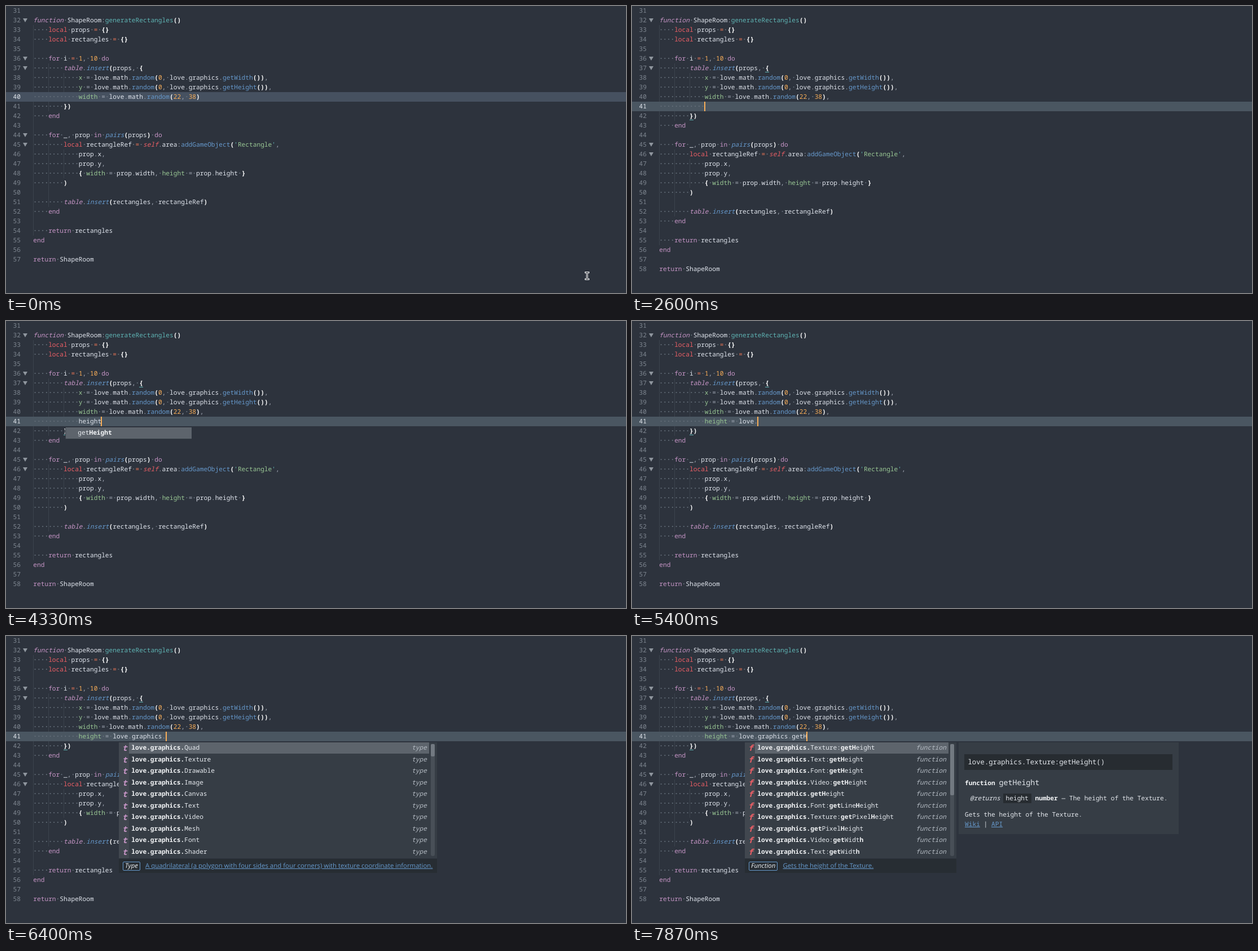
An HTML page for the animation above (8000 ms loop, 1099 px wide and 510 px high).

```html
<!DOCTYPE html>
<html lang="en">
<head>
<meta charset="utf-8">
<title>Code editor</title>
<style>
html, body { margin: 0; width: 100%; height: 100%; overflow: hidden; background: #2d333d; }
#stage {
  position: relative; width: 1099px; height: 510px; overflow: hidden; background: #2d333d; color: #e0e5ed;
  font: 500 11.2px/17px 'Noto Sans Mono', monospace; white-space: pre; text-rendering: geometricPrecision;
  font-variant-ligatures: none;
}
#stage div, #stage svg { position: absolute; }
.row { left: 0; width: 1099px; height: 17px; }
.num { left: 12.6px; color: #7f8791; }
.num.now { color: #e3e8ee; }
.fold { left: 30px; border: 4.5px solid transparent; border-top: 7px solid #8f969e; border-bottom: 0; }
.guide { width: 1px; height: 17px; background: #3b434d; }
.caret { width: 2px; height: 17px; background: #f9ae58; }
.mark { width: 7px; height: 1px; }
.ws { color: #66707b; font-weight: 700; }
.br { color: #fff; font-weight: 700; }
.kw { color: #c695c6; }
.red { color: #ec5f66; }
.blue { color: #6699cc; }
.teal { color: #5fb4b4; }
.str, .key { color: #99c794; }
.num1 { color: #f9ae58; }
.op { color: #f97b58; }
.pun { color: #a6acb9; }
.it { font-style: italic; }
.pop { top: 189px; background: #363d45; }
.sel { background: #5d646c; }
.pop .item { line-height: 20px; color: #e6eaef; }
.pop b, .docs b { color: #f3f5f7; font-weight: 700; }
.kinds { left: 0; top: 0; width: 18px; background: #41474f; }
.kind { left: 6px; font: italic 700 14.5px/20px 'Noto Sans Mono', monospace; }
.detail { right: 18px; line-height: 20px; font-style: italic; color: #b4bbc3; }
.track { top: 3px; width: 7px; height: 199px; border-radius: 3px; background: #484f57; }
.thumb { top: 3px; width: 7px; border-radius: 2px; background: #727981; }
.foot { left: 0; height: 25px; background: #272d33; font: 11.42px/25px 'Open Sans', sans-serif; }
.tag {
  left: 7px; top: 5px; padding: 0 3px; border: 1px solid #6699cc; border-radius: 2px;
  font-style: italic; line-height: 14px; color: #f0f3f6;
}
.link { color: #6699cc; text-decoration: underline; }
.foot .link { top: 0; }
.docs { left: 579px; top: 189px; width: 390px; height: 163px; background: #363d45; color: #e3e7ec; }
.chip { background: #272c31; }
</style>
</head>
<body>
<div id="stage"></div>
<script>
const stage = document.getElementById('stage');
const X0 = 48.3, CW = 6.72, LH = 17, PITCH = 20.56;
const FRAME = 1000 / 15, COUNT = 120;

const CODE = `
function ShapeRoom:generateRectangles()
    local props = {}
    local rectangles = {}

    for i = 1, 10 do
        table.insert(props, {
            x = love.math.random(0, love.graphics.getWidth()),
            y = love.math.random(0, love.graphics.getHeight()),
            width = love.math.random(22, 38)
        })
    end

    for _, prop in pairs(props) do
        local rectangleRef = self.area:addGameObject('Rectangle',
            prop.x,
            prop.y,
            { width = prop.width, height = prop.height }
        )

        table.insert(rectangles, rectangleRef)
    end

    return rectangles
end

return ShapeRoom`.split('\n');

const STYLE = {};
const style = (words, cls) => words.split(' ').forEach(w => STYLE[w] = cls);
style('function table', 'kw it');
style('for in do end return', 'kw');
style('local', 'red');
style('self', 'red it');
style('insert pairs', 'blue it');
style('random getWidth getHeight addGameObject', 'blue');
style('generateRectangles', 'teal');

// Step tables: [frame, value]
const COMMA = 36, ENTER = 39;
const TYPED = [
  [39, ''], [54, 'h'], [57, 'he'], [60, 'hei'], [61, 'heig'], [65, 'height'], [68, 'height '],
  [70, 'height ='], [72, 'height = '], [73, 'height = l'], [76, 'height = lo'], [78, 'height = lov'],
  [80, 'height = love'], [81, 'height = love.'], [84, 'height = love.g'], [85, 'height = love.gr'],
  [87, 'height = love.gra'], [88, 'height = love.grap'], [89, 'height = love.graph'],
  [92, 'height = love.graphi'], [93, 'height = love.graphic'], [94, 'height = love.graphics'],
  [96, 'height = love.graphics.'], [98, 'height = love.graphics.g'], [100, 'height = love.graphics.ge'],
  [101, 'height = love.graphics.get'], [105, 'height = love.graphics.getH']
];
const POPUPS = [
  [0, null], [55, 'h'], [68, null], [74, 'l'], [81, null], [82, 'love'],
  [84, 'draw'], [96, 'types'], [98, 'get'], [105, 'height']
];
const KEYS = [14, 16, 36, ...TYPED.map(s => s[0]), 118];

const names = (prefix, list) => list.split(' ').map(n => prefix + n);
const G = 'love.graphics.';
const LISTS = {
  h: { x: 105, w: 224, items: names('', 'height getHeight ShapeRoom math width graphics getWidth push path') },
  l: { x: 166, w: 224, items: names('', 'local love else self table false rectangles rectangleRef elseif') },
  love: {
    x: 200, w: 465, kind: 'm', detail: 'module', tag: 'Module', thumb: 60,
    note: 'Provides an interface to output sound to the speakers.',
    items: names('love.', 'audio data event filesystem font graphics image joystick keyboard math')
  },
  draw: {
    x: 200, w: 465, kind: 't', detail: 'type', tag: 'Type', thumb: 23,
    note: 'A 2D polygon mesh used for drawing arbitrary textured shapes.',
    items: names(G, 'Mesh Texture Drawable Image Canvas Text Video Quad Font Shader')
  },
  types: {
    x: 200, w: 564, kind: 't', detail: 'type', tag: 'Type', thumb: 22,
    note: 'A quadrilateral (a polygon with four sides and four corners) with texture coordinate information.',
    items: names(G, 'Quad Texture Drawable Image Canvas Text Video Mesh Font Shader')
  },
  get: {
    x: 200, w: 465, kind: 'f', detail: 'function', tag: 'Function', thumb: 30,
    note: 'Gets the current Font object.',
    items: names(G, 'getFont getColor getWidth getHeight getCanvas getShader getStats getScissor getMode getLineJoin')
  },
  height: {
    x: 200, w: 375, kind: 'f', detail: 'function', tag: 'Function', thumb: 91,
    note: 'Gets the height of the Texture.',
    items: names(G, 'Texture:getHeight Text:getHeight Font:getHeight Video:getHeight getHeight ' +
      'Font:getLineHeight Texture:getPixelHeight getPixelHeight Video:getWidth Text:getWidth')
  }
};

const last = (steps, f) => steps.filter(s => s[0] <= f).pop();
const span = (cls, s) => cls ? `<span class="${cls}">${s}</span>` : s;
const box = (cls, x, y, inner = '', css = '') =>
  `<div class="${cls}" style="left:${x}px;top:${y}px;${css}">${inner}</div>`;
const size = (w, h) => `width:${w}px;height:${h}px;`;
const colX = c => X0 + c * CW;
const lineY = i => i * LH;

function paint(line) {
  let afterKey = false;
  return line.replace(/'[^']*'|\w+| +|./g, (tok, pos) => {
    if (tok[0] === ' ') return span('ws', '·'.repeat(tok.length));
    if (tok[0] === "'" && tok.length > 1)
      return span('teal', "'") + span('str', tok.slice(1, -1)) + span('teal', "'");
    if (/^\d/.test(tok)) return span('num1', tok);
    if (/^\w/.test(tok)) {
      afterKey = /^(x|y|width|height)$/.test(tok) && line.startsWith(' =', pos + tok.length);
      return span(afterKey ? 'key' : STYLE[tok], tok);
    }
    if (tok === '=') return span(afterKey ? 'pun' : 'op', tok);
    return span(/[.,:]/.test(tok) ? 'pun' : 'br', tok);
  });
}

// Bold the letters of the query in order; null when they do not all occur
function match(name, query) {
  let q = 0, out = '';
  for (const ch of name) {
    const hit = q < query.length && ch.toLowerCase() === query[q].toLowerCase();
    if (hit) q++;
    out += hit ? `<b>${ch}</b>` : ch;
  }
  return q < query.length ? null : out.replace(/<\/b><b>/g, '');
}

function popup(p, query) {
  const rows = p.items.filter(n => n !== query).map(n => match(n, query)).filter(Boolean);
  if (!rows.length) return '';
  const rich = !!p.kind;
  const h = (rich ? 10 : rows.length) * PITCH;
  const color = { t: '#c695c6', f: '#ec5f66', m: '#6699cc' }[p.kind];
  let s = rich ? `<div class="kinds" style="height:${h}px"></div>` : '';
  s += box('sel', rich ? 18 : 1, 0, '', size(rich ? p.w - 32 : p.w - 1, 20));
  rows.forEach((r, i) => {
    const y = i * PITCH;
    s += box('item', 22.3, y, r);
    if (!rich) return;
    s += `<div class="kind" style="top:${y}px;color:${color}">${p.kind}</div>`;
    s += `<div class="detail" style="top:${y}px">${p.detail}</div>`;
  });
  if (rich) {
    s += `<div class="track" style="right:4px"></div>`;
    s += `<div class="thumb" style="right:4px;height:${p.thumb}px"></div>`;
    const noteX = p.tag === 'Type' ? 47 : p.tag === 'Module' ? 62 : 67.5;
    s += `<div class="foot" style="top:207px;width:${p.w}px"><div class="tag">${p.tag}</div>` +
      `<div class="link" style="left:${noteX}px">${p.note}</div></div>`;
  }
  return `<div class="pop" style="left:${p.x}px;${size(p.w, h)}">${s}</div>`;
}

function docs() {
  return '<div class="docs">' +
    box('chip', 10, 21, '', size(369, 28)) +
    box('', 16.5, 26, 'love.graphics.Texture:getHeight()', 'font-size:12.25px') +
    box('', 11, 64, '<b>function</b>') +
    box('', 71.5, 63, 'getHeight', 'font-size:13.3px') +
    box('it', 20, 91, '@returns') +
    box('chip', 79, 91, '', size(50, 17)) +
    box('', 83.5, 91, 'height') +
    box('', 135.5, 91, '<b>number</b> — The height of the Texture.') +
    box('', 11, 120, 'Gets the height of the Texture.') +
    box('', 11, 137, '<span class="link">Wiki</span> | <span class="link">API</span>') +
    '</div>';
}

const MOVES = [
  [1, 11, 1030, 479.5, 400, 165.5],
  [14, 16, 400, 165.5, 400, 170.5],
  [20, 24, 400, 170.5, 682, 203.5]
];

function pointer(f) {
  let x = 1030, y = 479.5;
  for (const [a, b, x0, y0, x1, y1] of MOVES) {
    if (f < a) break;
    const k = Math.min(1, (f - a + 1) / (b - a + 1)), e = k * k * (3 - 2 * k);
    x = x0 + (x1 - x0) * e;
    y = y0 + (y1 - y0) * e;
  }
  const d = 'M1.5 1.5h5M4 1.5v12M1.5 13.5h5';
  return `<svg width="8" height="15" style="left:${Math.round(x - 4)}px;top:${Math.round(y - 7.5)}px">` +
    `<g fill="none" stroke-linecap="square"><path d="${d}" stroke="#fff" stroke-width="3"/>` +
    `<path d="${d}" stroke="#20252c" stroke-width="1"/></g></svg>`;
}

function caretAlpha(f) {
  const age = f - KEYS.filter(k => k <= f).pop();
  if (age < 4) return 1;
  if (age < 15) return Math.max(0, 1 - (age - 3) / 5);
  return Math.min(1, (age - 14) / 4);
}

function draw(f) {
  const lines = CODE.slice();
  const entered = f >= ENTER, cur = entered ? 10 : 9;
  const typed = entered ? last(TYPED, f)[1] : '';
  if (f >= COMMA) lines[9] += ',';
  if (entered) lines.splice(10, 0, ' '.repeat(12) + typed);

  let s = box('row', 0, lineY(cur), '', `background:${f < 14 ? '#465160' : '#4a5661'}`);
  lines.forEach((line, i) => {
    const y = lineY(i);
    const ref = line || lines[i + 1] || '';
    const indent = ref.match(/^ */)[0].length;
    for (let c = 0; c < indent; c += 4)
      if (i !== cur) s += box('guide', Math.round(colX(c)), y);
    s += `<div class="num${i === cur ? ' now' : ''}" style="top:${y}px">${31 + i}</div>`;
    if (/^function|^ +for |\{$|Ref =/.test(line)) s += `<div class="fold" style="top:${y + 5}px"></div>`;
    s += box('', X0, y, paint(line));
  });

  if (f >= 14) {
    const mark = (col, i, color) => box('mark', Math.round(colX(col)), lineY(i) + 15, '', `background:${color}`);
    if (f < COMMA) s += mark(36, 9, '#f9ae58') + mark(43, 9, '#f9ae58');
    else s += mark(28, 6, '#5fb4b4') + mark(8, entered ? 11 : 10, '#5fb4b4');
    const col = lines[cur].length;
    s += box('caret', Math.floor(colX(col) - 0.5), lineY(cur), '', `opacity:${caretAlpha(f)}`);
  }

  const name = last(POPUPS, f)[1];
  if (name) s += popup(LISTS[name], typed.split(' ').pop());
  if (f >= 118) s += docs();
  if (f < COMMA) s += pointer(f);
  stage.innerHTML = s;
}

let shown = -1;
function tick() {
  const f = Math.floor((performance.now() % 8000 + 4) / FRAME) % COUNT;
  if (f !== shown) draw(shown = f);
  requestAnimationFrame(tick);
}
tick();
</script>
</body>
</html>
```
